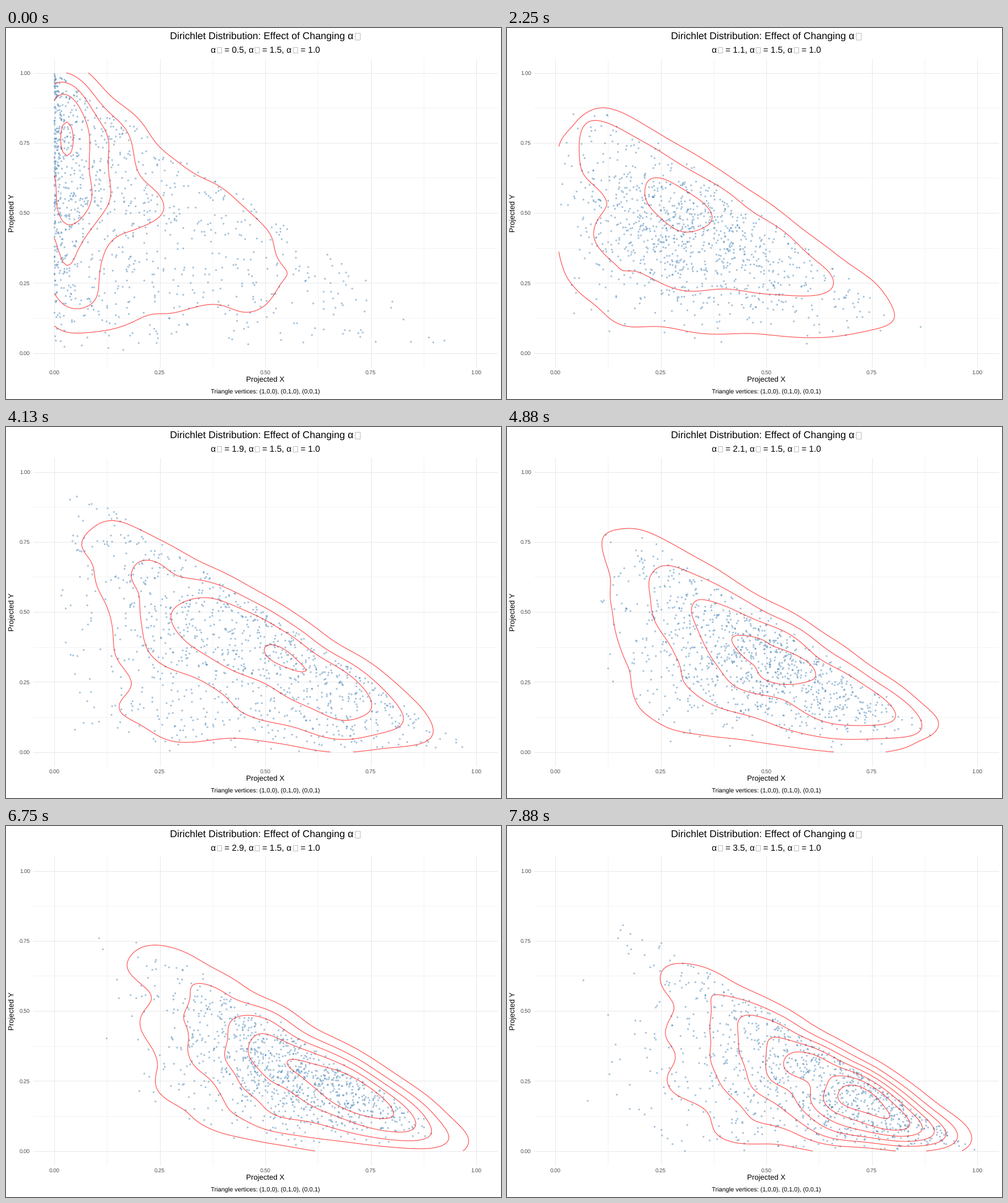
A matplotlib script for the animation above (8000 ms loop, 800 by 600 pixels).

```python
import numpy as np
import matplotlib.pyplot as plt
from matplotlib.animation import FuncAnimation
from matplotlib.collections import LineCollection
from matplotlib.patches import Rectangle

WIDTH, HEIGHT, DPI = 800, 600, 100
PT = 72 / DPI  # points per pixel
FRAMES, INTERVAL = 64, 125
COUNT, SAMPLES = 1000, 240
ALPHAS = 0.5 + 0.2 * np.arange(16)
# Frame at which each state is reached, and length of the tween before it.
ARRIVALS = [0, 5, 10, 15, 19, 25, 29, 33, 37, 41, 45, 49, 53, 56, 60, 63]
STEPS = [2 if k == 4 else 3 for k in range(16)]

rng = np.random.default_rng(7)
plt.rcParams["font.family"] = "Liberation Sans"
plt.rcParams["text.hinting"] = "none"
fig = plt.figure(figsize=(WIDTH / DPI, HEIGHT / DPI), dpi=DPI, facecolor="white")
ax = fig.add_axes([0, 0, 1, 1])


def to_px(x, y):
    return 78 + 682.2 * x, 525.5 - 453 * y


def resample(curve):
    """Evenly spaced points, always in the same turning direction."""
    x, y = curve.T
    if np.sum(x * np.roll(y, -1) - y * np.roll(x, -1)) < 0:
        curve = curve[::-1]
    dist = np.r_[0, np.cumsum(np.hypot(*np.diff(curve, axis=0).T))]
    u = np.linspace(0, dist[-1], SAMPLES)
    return np.column_stack([np.interp(u, dist, c) for c in curve.T])


def align(curve, other):
    """Start a closed curve where it lies closest to the other one."""
    if not np.allclose(curve[0], curve[-1]):
        return curve
    ring = curve[:-1]
    shift = min(range(0, len(ring), 3),
                key=lambda s: np.sum((np.roll(ring, -s, axis=0) - other[:-1]) ** 2))
    ring = np.roll(ring, -shift, axis=0)
    return np.vstack([ring, ring[:1]])


def density_curves(points):
    """Contours of a normal kernel density at whole-number levels."""
    grid = np.linspace(0, 1, 100)
    kernels = []
    for v in points.T:
        iqr = np.subtract(*np.percentile(v, [75, 25]))
        bw = 1.06 * min(v.std(), iqr / 1.34) * COUNT ** -0.2
        z = (grid[:, None] - v) / bw
        kernels.append(np.exp(-z * z / 2) / (bw * np.sqrt(2 * np.pi)))
    density = kernels[1] @ kernels[0].T / COUNT
    contours = ax.contour(*to_px(grid, grid), density, levels=np.arange(1, 13))
    curves = {}
    for level, segs in zip(contours.levels, contours.allsegs):
        segs = sorted((s for s in segs if len(s) > 8), key=len, reverse=True)
        for i, seg in enumerate(segs):
            curves[level, i] = resample(np.asarray(seg))
    contours.remove()
    return curves


clouds = [rng.dirichlet((a, 1.5, 1.0), COUNT)[:, :2] for a in ALPHAS]
outlines = [density_curves(cloud) for cloud in clouds]

ax.set(xlim=(0, WIDTH), ylim=(HEIGHT, 0))
ax.axis("off")


def label(x, y, text, size, **style):
    style = {"va": "baseline", "color": "black", **style}
    return ax.text(x, y, text, fontsize=size * PT, **style)


def missing_glyph(x, y, w, h):
    ax.add_patch(Rectangle((x, y), w, h, fill=False, ec="#999999", lw=0.6 * PT))


for i in range(9):
    gx, gy = to_px(i / 8, i / 8)
    major = i % 2 == 0
    grid_style = dict(color="#EBEBEB", lw=(1.07 if major else 0.53) * PT, zorder=0)
    ax.plot([gx, gx], [50, 548], **grid_style)
    ax.plot([44, 794], [gy, gy], **grid_style)
    if major:
        label(gx, 560, f"{i / 8:.2f}", 8.8, ha="center", color="#4D4D4D")
        label(39, gy + 3.2, f"{i / 8:.2f}", 8.8, ha="right", color="#4D4D4D")

label(265, 18, "Dirichlet Distribution: Effect of Changing α", 16)
missing_glyph(564, 7.5, 8, 11)
label(330.8, 40, "α", 14)
varying = label(352.9, 40, "", 14)
label(414.3, 40, "= 1.5, α", 14)
label(475.7, 40, "= 1.0", 14)
for i in range(3):
    missing_glyph(341 + 61.4 * i, 30.5, 7, 9.5)
label(419, 573, "Projected X", 12, ha="center")
label(14, 299, "Projected Y", 12, ha="center", rotation=90, rotation_mode="anchor")
label(419, 591, "Triangle vertices: (1,0,0), (0,1,0), (0,0,1)", 10, ha="center")

dots = ax.scatter([], [], s=(2.2 * PT) ** 2, color="steelblue", alpha=0.42,
                  linewidths=0.7 * PT, zorder=2)
lines = LineCollection([], colors="red", alpha=0.7, linewidths=1.07 * PT, zorder=3)
ax.add_collection(lines, autolim=False)


def position(n):
    """Upcoming or current state, and the progress towards it."""
    k = max(i for i in range(16) if n > ARRIVALS[i] - STEPS[i])
    return k, min(1, 1 - (ARRIVALS[k] - n) / STEPS[k])


def tween_curves(k, t):
    """Curves without a partner in the other state only show at rest."""
    if t == 1:
        return list(outlines[k].values())
    start, end = outlines[k - 1], outlines[k]
    curves = []
    for key in start.keys() & end.keys():
        a = align(start[key], end[key])
        b = align(end[key], a)
        curves.append((1 - t) * a + t * b)
    return curves


def draw(n):
    k, t = position(n)
    cloud = (1 - t) * clouds[max(k - 1, 0)] + t * clouds[k]
    dots.set_offsets(np.column_stack(to_px(*cloud.T)))
    lines.set_segments(tween_curves(k, t))
    nearest = k if t > 0.5 else k - 1
    varying.set_text(f"= {ALPHAS[nearest]:.1f}, α")
    return dots, lines, varying


anim = FuncAnimation(fig, draw, frames=FRAMES, interval=INTERVAL, repeat=True, repeat_delay=0)
plt.show()
```
